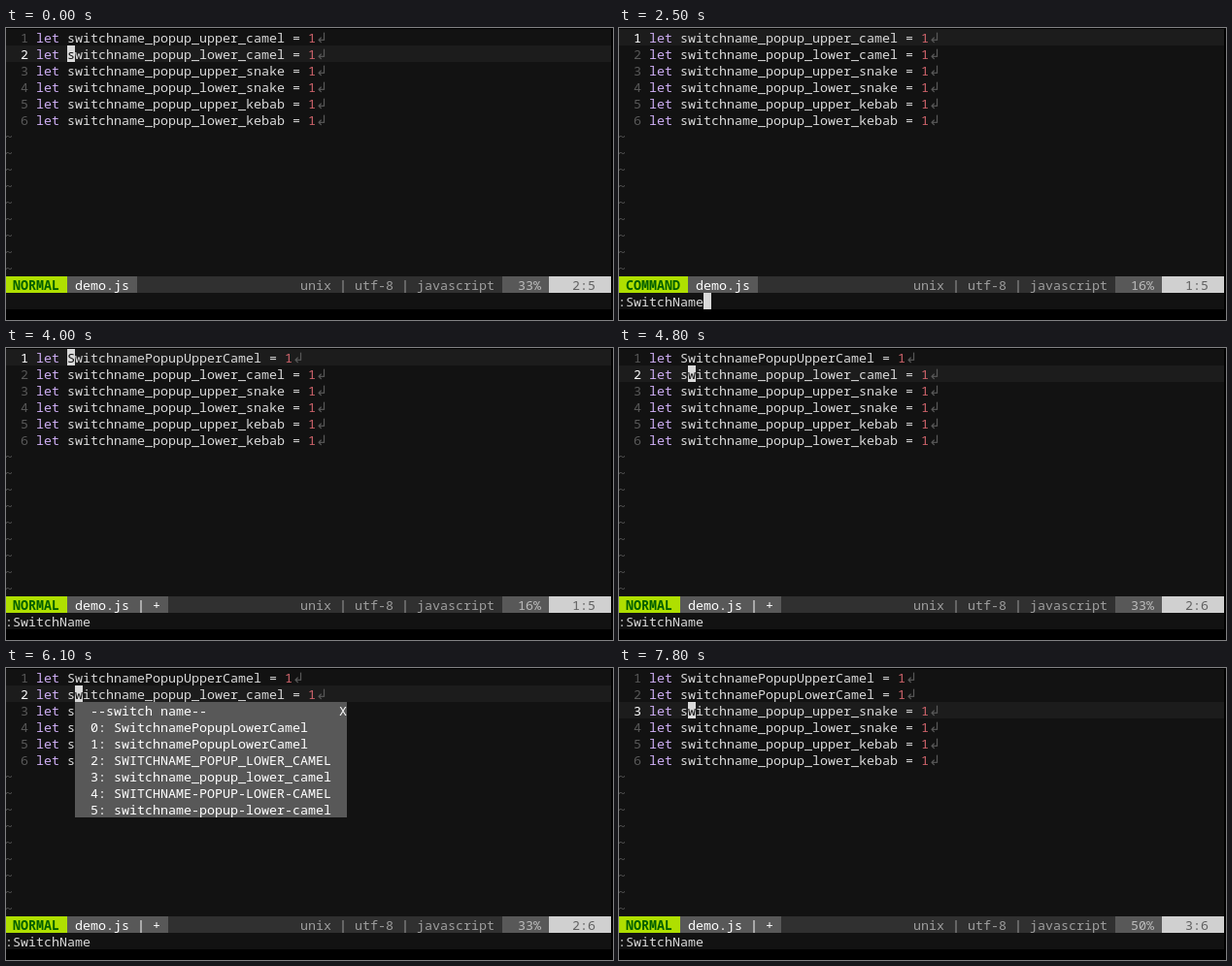
Write an HTML page that moves like this. It is 625 by 301 pixels and loops after 8000 ms.

```html
<!DOCTYPE html>
<html lang="en">
<head>
<meta charset="utf-8">
<title>Switch name popup</title>
<style>
  html, body { margin: 0; width: 100%; height: 100%; overflow: hidden; background: #000; }
  svg { display: block; width: 625px; height: 301px; }
  text {
    font: 13.3333px "Noto Sans Mono", "DejaVu Sans Mono", monospace;
    white-space: pre;
  }
  text.bold { font-weight: bold; }
  text.eol { font: 14.5px "DejaVu Sans", sans-serif; }
</style>
</head>
<body>
<svg id="stage" viewBox="0 0 625 301"></svg>
<script>
(() => {
  const CELL_W = 8, CELL_H = 17, LOOP = 8000;
  const STATUS_ROW = 15, COMMAND_ROW = 16;
  const color = {
    back: '#121212', line: '#1c1c1c', plain: '#dadada', dim: '#585858', white: '#ffffff',
    keyword: '#cfaff5', number: '#d0646c', popup: '#585858',
    mode: '#afdf00', modeText: '#005f00', bar: '#303030', barText: '#9e9e9e',
    percentText: '#bcbcbc', place: '#d0d0d0', placeText: '#606060'
  };

  const names = ['camel', 'snake', 'kebab'].flatMap(style =>
    ['upper', 'lower'].map(size => `switchname_popup_${size}_${style}`));

  const capital = word => word[0].toUpperCase() + word.slice(1);
  const pascal = name => name.split('_').map(capital).join('');
  const camel = name => name[0] + pascal(name).slice(1);
  const kebab = name => name.replaceAll('_', '-');
  const choices = name => [
    pascal(name), camel(name), name.toUpperCase(), name,
    kebab(name).toUpperCase(), kebab(name)
  ];

  // Each step changes only the listed parts of the editor state.
  const steps = [
    { at: 0, row: 1, col: 8, command: '', typing: false, popup: false, edits: 0 },
    { at: 200, row: 0 },
    { at: 900, command: ':', typing: true },
    { at: 1800, command: ':S' },
    { at: 2100, command: ':Sw' },
    { at: 2300, command: ':Swi' },
    { at: 2500, command: ':SwitchName' },
    { at: 2900, typing: false, popup: true },
    { at: 4000, popup: false, edits: 1 },
    { at: 4600, row: 1 },
    { at: 4800, col: 9 },
    { at: 5300, command: ':', typing: true },
    { at: 5700, command: ':SwitchName' },
    { at: 6100, typing: false, popup: true },
    { at: 7300, popup: false, edits: 2 },
    { at: 7800, row: 2 }
  ];
  const states = [];
  for (const step of steps) states.push({ ...states.at(-1), ...step });

  const cellX = col => col * CELL_W - 1;
  const cellY = row => row * CELL_H + 1;

  function box(col, row, cols, rows, fill) {
    const x = Math.max(0, cellX(col));
    const width = cellX(col + cols) - x;
    return `<rect x="${x}" y="${cellY(row)}" width="${width}" height="${rows * CELL_H}" fill="${fill}"/>`;
  }

  function label(col, row, string, fill, kind = '') {
    return `<text class="${kind}" x="${cellX(col)}" y="${cellY(row) + 14}" fill="${fill}">${string}</text>`;
  }

  function cursor(col, row, char = '') {
    return box(col, row, 1, 1, color.plain) + label(col, row, char, color.back);
  }

  function drawCode(state, lines) {
    let out = box(0, state.row, 78, 1, color.line);
    lines.forEach((name, row) => {
      const end = 8 + name.length;
      out += label(2, row, row + 1, row === state.row ? color.white : color.dim)
        + label(4, row, 'let', color.keyword)
        + label(8, row, name, color.plain)
        + label(end + 1, row, '=', color.plain)
        + label(end + 3, row, '1', color.number)
        + label(end + 4, row, '↲', color.dim, 'eol');
    });
    for (let row = lines.length; row < STATUS_ROW; row++) out += label(0, row, '~', color.dim);
    if (!state.typing) out += cursor(state.col, state.row, lines[state.row][state.col - 8]);
    return out;
  }

  function drawStatus(state) {
    const mode = state.typing ? 'COMMAND' : 'NORMAL';
    const file = state.edits ? 'demo.js | +' : 'demo.js';
    const fileCol = mode.length + 2;
    const percent = Math.floor((state.row + 1) * 100 / names.length);
    return box(0, STATUS_ROW, 78, 1, color.bar)
      + box(0, STATUS_ROW, fileCol, 1, color.mode)
      + label(1, STATUS_ROW, mode, color.modeText, 'bold')
      + box(fileCol, STATUS_ROW, file.length + 2, 1, color.dim)
      + label(fileCol + 1, STATUS_ROW, file, color.white)
      + label(38, STATUS_ROW, 'unix | utf-8 | javascript', color.barText)
      + box(64, STATUS_ROW, 6, 1, color.dim)
      + label(66, STATUS_ROW, percent + '%', color.percentText)
      + box(70, STATUS_ROW, 8, 1, color.place)
      + label(73, STATUS_ROW, `${state.row + 1}:${state.col - 3}`, color.placeText);
  }

  function drawPopup(state, name) {
    const { col, row } = state;
    const items = choices(name).map((choice, i) => `${i}: ${choice}`);
    return box(col, row + 1, 35, 7, color.popup)
      + label(col + 2, row + 1, '--switch name--', color.white)
      + label(col + 34, row + 1, 'X', color.white)
      + items.map((item, i) => label(col + 2, row + 2 + i, item, color.white)).join('');
  }

  function draw(state) {
    const lines = [...names];
    if (state.edits > 0) lines[0] = pascal(names[0]);
    if (state.edits > 1) lines[1] = camel(names[1]);
    return `<rect y="1" width="623" height="289" fill="${color.back}"/>`
      + drawCode(state, lines)
      + drawStatus(state)
      + label(0, COMMAND_ROW, state.command, color.plain)
      + (state.typing ? cursor(state.command.length, COMMAND_ROW) : '')
      + (state.popup ? drawPopup(state, names[state.row]) : '');
  }

  const stage = document.getElementById('stage');
  let shown;
  function tick() {
    const time = performance.now() % LOOP;
    const state = states.findLast(item => item.at <= time);
    if (state !== shown) {
      stage.innerHTML = draw(state);
      shown = state;
    }
    requestAnimationFrame(tick);
  }
  tick();
})();
</script>
</body>
</html>
```
